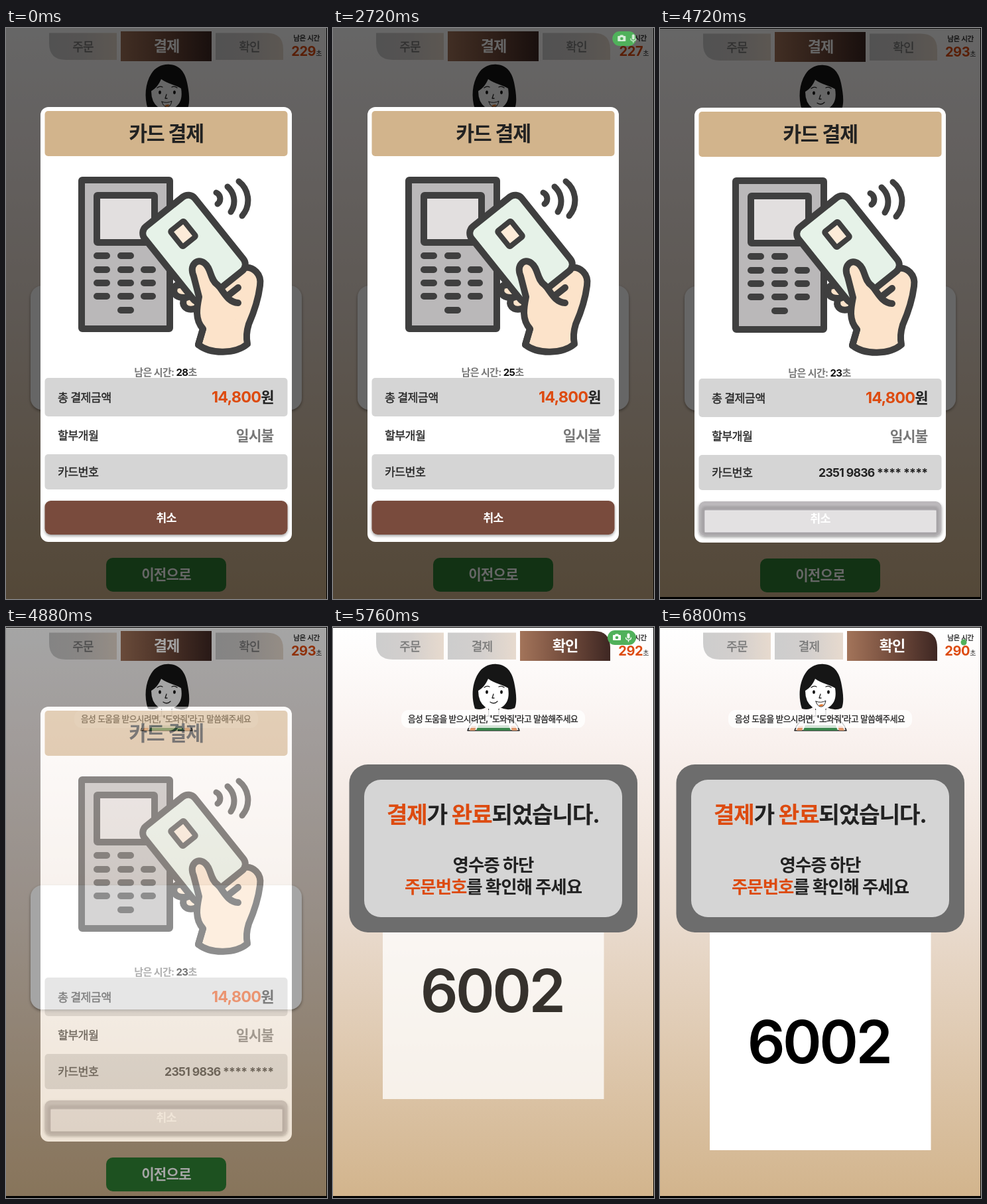
Recreate the animation shown at these times as an HTML page. Size 484x860 px, loop 6880 ms.

```html
<!DOCTYPE html>
<html lang="ko">
<head>
<meta charset="utf-8">
<title>카드 결제</title>
<style>
  html, body { margin: 0; width: 100%; height: 100%; overflow: hidden; background: #000; }
  svg { display: block; width: 484px; height: 860px; }
  text { font-family: Inter, "Noto Sans CJK KR", "Noto Sans CJK", sans-serif; letter-spacing: -.04em; fill: #222; }
  .mid { text-anchor: middle; }
  .end { text-anchor: end; }
  .b { font-weight: 700; }
  .m { font-weight: 500; stroke: #222; stroke-width: .3; }
  .w { fill: #fff; }
  .hot { fill: #dd4b10; }
  .mute { fill: #777; }
  .m.mute { stroke: #777; }
  .ink { stroke: #3f3f3f; stroke-width: 10; stroke-linecap: round; stroke-linejoin: round; }
  .skin { fill: #fce3ca; }
  .none { fill: none; }

  #stage, #edges, #pay, #done, #tabPay, #tabEnd, #back, #cancel, #pressed {
    animation: 6880ms step-end infinite;
  }
  #stage { animation-name: nudge; }
  #edges, #pressed { animation-name: late; }
  #cancel { animation-name: early; }
  #pay { animation-name: payPage; }
  #done { animation-name: donePage; }
  #tabPay, #back { animation-name: firstTab; }
  #tabEnd { animation-name: lastTab; }
  #dialog { animation: close 6880ms linear infinite; }
  #paper { animation: print 6880ms linear infinite; }
  #pill { animation: pill 6880ms ease-in-out infinite; }
  #icons { animation: icons 6880ms ease-in-out infinite; }

  @keyframes nudge { 0% { transform: none; } 68.6%, 100% { transform: translateY(1px); } }
  @keyframes late { 0% { visibility: hidden; } 68.6%, 100% { visibility: visible; } }
  @keyframes early { 0% { visibility: visible; } 68.6%, 100% { visibility: hidden; } }
  @keyframes payPage { 0% { visibility: visible; } 72.6%, 100% { visibility: hidden; } }
  @keyframes donePage { 0% { visibility: hidden; } 72.6%, 100% { visibility: visible; } }
  @keyframes firstTab { 0% { visibility: visible; } 77.9%, 100% { visibility: hidden; } }
  @keyframes lastTab { 0% { visibility: hidden; } 77.9%, 100% { visibility: visible; } }
  @keyframes close { 0%, 69.77% { opacity: 1; } 72.67%, 100% { opacity: 0; } }
  @keyframes print {
    0%, 76.96% { transform: translateY(-328px); opacity: 0; animation-timing-function: ease; }
    91.5%, 100% { transform: none; opacity: 1; }
  }
  @keyframes pill {
    0%, 37.2% { x: 446px; y: 5px; width: 11px; height: 22px; opacity: 0; }
    37.21% { x: 446px; y: 5px; width: 11px; height: 22px; opacity: 1; }
    40.7%, 43.6% { x: 414px; y: 5px; width: 43px; height: 22px; opacity: 1; }
    46.51%, 50% { x: 453.5px; y: 18.5px; width: 9px; height: 9px; opacity: 1; }
    50.01% { x: 453.5px; y: 18.5px; width: 9px; height: 9px; opacity: 0; }
    79.06% { x: 446px; y: 5px; width: 11px; height: 22px; opacity: 0; }
    79.07% { x: 446px; y: 5px; width: 11px; height: 22px; opacity: 1; }
    82.56%, 93% { x: 414px; y: 5px; width: 43px; height: 22px; opacity: 1; }
    97.4%, 100% { x: 453.5px; y: 18.5px; width: 9px; height: 9px; opacity: 1; }
  }
  @keyframes icons {
    0%, 37.21% { opacity: 0; transform: translateX(32px); }
    40.7%, 43.6% { opacity: 1; transform: none; }
    44.6% { opacity: 0; transform: none; }
    79.07% { opacity: 0; transform: translateX(32px); }
    82.56%, 93% { opacity: 1; transform: none; }
    94.5%, 100% { opacity: 0; transform: none; }
  }
</style>
</head>
<body>
<svg viewBox="0 0 484 860" xmlns="http://www.w3.org/2000/svg">
  <defs>
    <linearGradient id="wall" x2="0" y2="1">
      <stop stop-color="#fff"/><stop offset=".2" stop-color="#f9f1ee"/>
      <stop offset=".5" stop-color="#eadcd0"/><stop offset="1" stop-color="#d2b48c"/>
    </linearGradient>
    <linearGradient id="idle">
      <stop stop-color="#cdcdcd"/><stop offset=".5" stop-color="#d3cfcd"/><stop offset="1" stop-color="#e7dace"/>
    </linearGradient>
    <linearGradient id="live">
      <stop stop-color="#a3745a"/><stop offset=".5" stop-color="#744d3d"/><stop offset="1" stop-color="#3e2723"/>
    </linearGradient>
    <filter id="drop" x="-10%" y="-20%" width="120%" height="150%">
      <feDropShadow dx="0" dy="2" stdDeviation="2" flood-opacity=".4"/>
    </filter>
    <filter id="soft"><feGaussianBlur stdDeviation="2"/></filter>
    <clipPath id="slot"><path d="M0 450H484V860H0z"/></clipPath>
  </defs>

  <rect width="484" height="860" fill="url(#wall)"/>

  <g id="stage">
    <!-- tabs and session timer -->
    <path d="M65 7.5H167V48H90Q65 48 65 23z" fill="url(#idle)"/>
    <text class="mid m mute" x="116" y="34.5" font-size="18">주문</text>
    <g id="tabPay">
      <path d="M316 7.5H393Q418 7.5 418 32V48H316z" fill="url(#idle)"/>
      <text class="mid m mute" x="367" y="34.5" font-size="18">확인</text>
      <path d="M173 5H310V50H173z" fill="url(#live)"/>
      <text class="mid b w" x="242" y="35" font-size="22">결제</text>
    </g>
    <g id="tabEnd">
      <path d="M173 7.5H276V48H173z" fill="url(#idle)"/>
      <text class="mid m mute" x="224.5" y="34.5" font-size="18">결제</text>
      <path d="M282 5H393Q418 5 418 30V50H282z" fill="url(#live)"/>
      <text class="mid b w" x="350" y="35" font-size="22">확인</text>
    </g>
    <text class="mid m" x="453" y="19" font-size="10.5">남은 시간</text>
    <text class="end" x="476" y="41.5" font-size="10"><tspan id="session" class="b hot" font-size="20">229</tspan>초</text>

    <!-- assistant -->
    <g stroke-linecap="round" stroke-linejoin="round">
      <path d="M203 155Q207 141 219 138L233 133H251L265 138Q277 141 281 155z" fill="#eee" stroke="#222" stroke-width="1.5"/>
      <path d="M216 155L219 147H265L268 155z" fill="#38854b"/>
      <path d="M206 155L209 148H216L214 155zM270 155L268 148H275L278 155z" fill="#dd9467"/>
      <path d="M214 122C208 104 210 83 219 69C225 59 236 54 247 55C262 56 270 67 273 82C276 96 278 112 274 121Q263 126 252 120L232 119Q224 125 214 122z" fill="#161616"/>
      <path d="M235 116H250V132Q242 139 235 132z" fill="#fff" stroke="#222"/>
      <path d="M219 95C226 91 231 84 234 77C244 84 256 86 264 91C266 103 264 112 257 118Q243 128 230 120Q219 112 219 95z" fill="#fff"/>
      <g class="none" stroke="#222" stroke-width="1.3">
        <path d="M228 90Q232 87 236 89M250 89Q254 87 258 90M242 100L240 106H243"/>
      </g>
      <ellipse cx="232" cy="97" rx="1.9" ry="2.8" fill="#111"/>
      <ellipse cx="254" cy="97" rx="1.9" ry="2.8" fill="#111"/>
      <path id="open" d="M235 111Q243 114 250 110Q248 120 242 119Q237 118 235 111z" fill="#fff" stroke="#222"/>
      <path id="lip" d="M239 117Q243 114 247 116Q243 121 239 117z" fill="#e17b35"/>
      <path id="shut" class="none" d="M237 112Q243 116 248 111" stroke="#222" stroke-width="1.3"/>
    </g>
    <rect x="103" y="124" width="277" height="27" rx="11" fill="#fff" fill-opacity=".78"/>
    <text class="mid m" x="241" y="142" font-size="12.7">음성 도움을 받으시려면, '도와줘'라고 말씀해주세요</text>

    <rect id="pay" x="37" y="388" width="409" height="187" rx="18" fill="#fff" filter="url(#drop)"/>

    <g id="done">
      <g clip-path="url(#slot)">
        <g id="paper">
          <rect x="75" y="459" width="333.5" height="328" fill="#fff"/>
          <text class="mid" x="239.5" y="655.5" font-size="89" font-weight="600" style="fill:#000">6002</text>
        </g>
      </g>
      <rect x="24.5" y="206" width="434.5" height="253" rx="28" fill="#6d6d6d"/>
      <rect x="47" y="229" width="389" height="207" rx="25" fill="#d5d5d5"/>
      <text class="mid b" x="241" y="294" font-size="34.5"><tspan class="hot">결제</tspan>가 <tspan class="hot">완료</tspan>되었습니다.</text>
      <text class="mid b" x="241.5" y="367" font-size="26.5">영수증 하단</text>
      <text class="mid b" x="241.5" y="400" font-size="26.5"><tspan class="hot">주문번호</tspan>를 확인해 주세요</text>
    </g>

    <g id="back">
      <rect x="151" y="798" width="181" height="51" rx="10" fill="#2e7d32"/>
      <text class="mid b w" x="241.5" y="831" font-size="21.2">이전으로</text>
    </g>

    <g id="dialog">
      <path d="M0-2H484V862H0z" fill-opacity=".6"/>
      <rect x="52" y="119" width="379" height="655" rx="12" fill="#fff"/>
      <rect x="58.5" y="125" width="366" height="68" rx="5" fill="#d2b48c"/>
      <text class="mid b" x="241.5" y="170" font-size="30.3">카드 결제</text>

      <!-- terminal -->
      <g class="ink">
        <rect x="114" y="229" width="133" height="224" rx="1" fill="#bab8b9"/>
        <rect x="137" y="252" width="87" height="71" rx="1" fill="#e2dfdf"/>
        <path class="none" d="M137 343h15m21 0h15M137 364h15m21 0h15m20 0h13M137 384h15m21 0h15m20 0h13M137 404h15m21 0h15m20 0h13M173 425h15"/>
      </g>
      <!-- hand and card -->
      <g class="ink skin">
        <path d="M256 388C249 398 256 407 270 406L293 410L282 383z"/>
        <path d="M269 407C264 417 270 426 284 423L298 416L290 400z"/>
        <path d="M360 361C372 359 386 370 383 388C380 412 373 430 366 446Q361 462 364 476C346 491 309 492 290 477L297 453L310 380z"/>
      </g>
      <g class="ink">
        <rect x="-71.5" y="-48.5" width="143" height="97" rx="13" fill="#e6f2e8" transform="translate(283.5 332.5) rotate(51.3)"/>
        <rect x="-15" y="-13" width="30" height="26" rx="2" fill="#fdebd8" style="stroke-width:8" transform="translate(267 310) rotate(51.3)"/>
        <path class="none" style="stroke-width:9" d="M317 248A10 10 0 0 1 319 265M334 239A29 29 0 0 1 339 277M351 231A36 36 0 0 1 356 283"/>
      </g>
      <path class="skin" d="M297 453C285 440 288 420 291 405L283 374C276 357 288 346 299 354C310 362 307 379 319 387C327 397 333 413 350 415L345 453z"/>
      <path class="ink none" d="M290 477L297 453C284 439 288 420 291 405L283 374C276 357 288 346 299 354C310 362 307 379 319 387C327 394 333 413 350 414M336 402L350 391"/>

      <text class="mid b mute" x="240.5" y="523.5" font-size="15">남은 시간: <tspan id="left" style="fill:#111">28</tspan>초</text>
      <rect x="58.5" y="527" width="366" height="58" rx="5" fill="#d5d5d5"/>
      <text class="m" x="78" y="562.5" font-size="17.4">총 결제금액</text>
      <text class="end b" x="403.5" y="564" font-size="22"><tspan class="hot" font-size="23.5">14,800</tspan>원</text>
      <text class="m" x="78" y="620" font-size="17.4">할부개월</text>
      <text class="end b mute" x="403.5" y="621.5" font-size="21.5">일시불</text>
      <rect x="58.5" y="642" width="366" height="53" rx="5" fill="#d5d5d5"/>
      <text class="m" x="78" y="675" font-size="17.4">카드번호</text>
      <text id="card" class="end b" x="403.5" y="675" font-size="17.6"></text>

      <rect id="cancel" x="58.5" y="712" width="366" height="51" rx="9" fill="#794c3c" filter="url(#drop)"/>
      <g id="pressed">
        <rect x="58.5" y="712" width="366" height="52" rx="9" fill="#bbb8bb" filter="url(#drop)"/>
        <rect x="65" y="722" width="353" height="38" rx="3" class="none" stroke="#9a979a" stroke-width="4" filter="url(#soft)"/>
        <rect x="68" y="726" width="348" height="32" fill="#e3e1e2" stroke="#ebe9eb"/>
      </g>
      <text class="mid b w" x="241.5" y="744" font-size="17.4">취소</text>
    </g>
  </g>

  <path d="M483 0H484V860H483z"/>
  <path id="edges" d="M0 0H484V1H0zM0 857H484V860H0z"/>

  <rect id="pill" rx="11" fill="#50b15b"/>
  <g id="icons" fill="#fff">
    <path d="M423 12h2l1-1.500h4l1 1.500h2q1 0 1 1v6q0 1-1 1h-10q-1 0-1-1v-6q0-1 1-1z"/>
    <circle cx="428" cy="16" r="2.3" fill="#50b15b"/>
    <rect x="443.5" y="9.5" width="4" height="8" rx="2"/>
    <path class="none" d="M441.500 15.500q0 4 4 4t4-4M445.500 19.500v3" stroke="#fff" stroke-width="1.3"/>
  </g>
</svg>
<script>
  const LOOP = 6880;
  const el = id => document.getElementById(id);

  // Each track lists [start in ms, value].
  const session = [[0, 229], [720, 228], [1760, 227], [2800, 226], [3760, 294], [4720, 293], [5120, 292], [6160, 291], [6640, 290]];
  const left = [[0, 28], [1040, 27], [1760, 26], [2640, 25], [3600, 24], [4080, 23]];
  const card = [[0, ''], [3760, '2351 9836 **** ****']];
  const talk = [[0, 1], [1040, 0], [2400, 1], [3280, 0], [3600, 1], [4400, 0], [5120, 1], [5440, 0], [6160, 1]];

  const at = (track, t) => track.findLast(([start]) => start <= t)[1];
  const show = (id, on) => el(id).setAttribute('visibility', on ? 'visible' : 'hidden');
  const write = (id, value) => {
    const node = el(id), text = String(value);
    if (node.textContent !== text) node.textContent = text;
  };

  function draw() {
    const t = performance.now() % LOOP;
    write('session', at(session, t));
    write('left', at(left, t));
    write('card', at(card, t));
    const open = at(talk, t);
    show('open', open);
    show('lip', open);
    show('shut', !open);
    requestAnimationFrame(draw);
  }
  draw();
</script>
</body>
</html>
```
